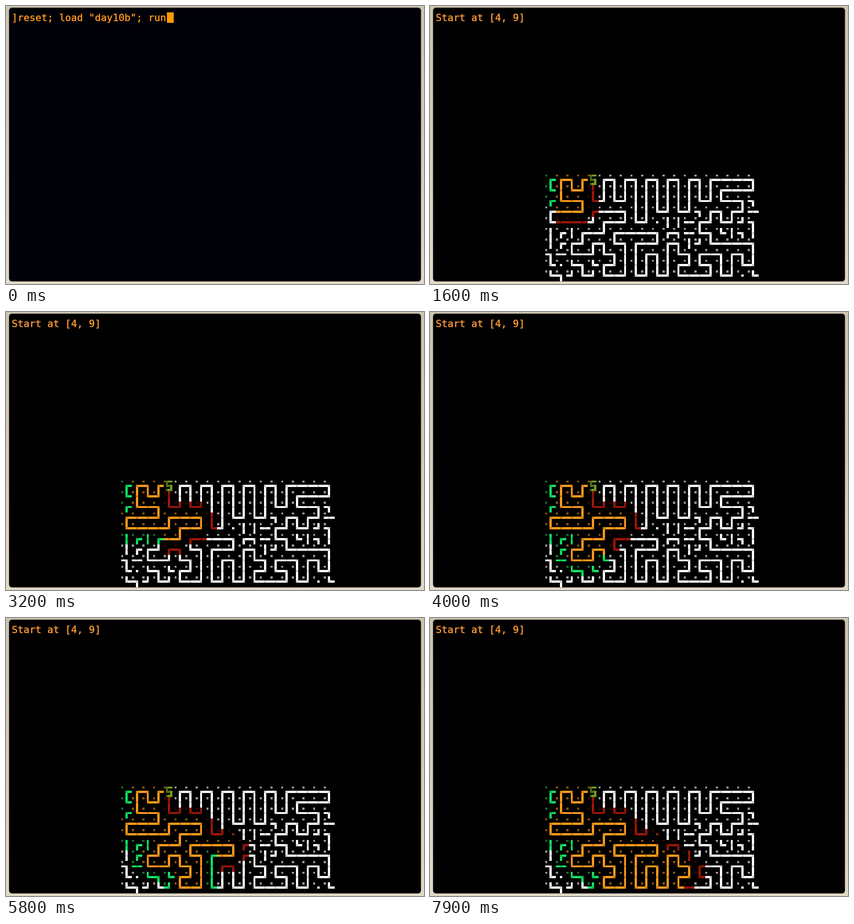
These frames come from a looping animation (917 px wide and 610 px high, 8000 ms). An HTML page with a canvas:

```html
<!DOCTYPE html>
<html lang="en">
<head>
<meta charset="utf-8">
<title>Pipe maze</title>
<style>
  html, body { margin: 0; width: 100%; height: 100%; overflow: hidden; }
  body { background: linear-gradient(#cbc4b0, #d5cdb9 50%, #e2dac8); }
  #screen {
    position: absolute; left: 7px; top: 4px; width: 903px; height: 600px;
    border-radius: 6px; box-shadow: 0 0 1px 0.5px #4a463a;
  }
  canvas { position: absolute; left: 0; top: 0; }
  #line {
    position: absolute; left: 12.5px; top: 13px; white-space: pre;
    font: 21.65px/25px "DejaVu Sans Mono", "Noto Sans Mono", monospace;
    -webkit-text-stroke: 0.5px currentColor;
  }
  #cursor {
    position: absolute; left: 353px; top: 14px; width: 15px; height: 23px;
    background: #ff9a00;
  }
</style>
</head>
<body>
<div id="screen"></div>
<canvas id="maze" width="917" height="610"></canvas>
<div id="line"></div>
<div id="cursor"></div>
<script>
const MAP = [
  'FF7FSF7F7F7F7F7F---7',
  'L|LJ||||||||||||F--J',
  'FL-7LJLJ||||||LJL-77',
  'F--JF--7||LJLJ7F7FJ-',
  'L---JF-JLJ.||-FJLJJ7',
  '|F|F-JF---7F7-L7L|7|',
  '|FFJF7L7F-JF7|JL---7',
  '7-L-JL7||F7|L7F-7F7|',
  'L.L7LFJ|||||FJL7||LJ',
  'L7JLJL-JLJLJL--JLJ.L'
];
const START = [4, 0];
const LOOP = 8000, FRAME = 100;
const FIRST_STEP = 439, STEP = 102.5;

// Directions: 0 north, 1 east, 2 south, 3 west
const DX = [0, 1, 0, -1], DY = [-1, 0, 1, 0];
const ARMS = { '|': [0, 2], '-': [1, 3], L: [0, 1], J: [0, 3], 7: [2, 3], F: [1, 2], '.': [] };

// Each state: line, centre, corner dot
const COLORS = {
  plain: ['#ffffff', '#cfcfcf', '#989898'],
  path:  ['#ff9a1c', '#cf7c18', '#885210'],
  left:  ['#9c1608', '#7e1006', '#300500'],
  right: ['#10e464', '#12b852', '#187038']
};
const S_GLYPH = ['###', '#..', '###', '..#', '###'];

const ctx = document.getElementById('maze').getContext('2d');
const screenEl = document.getElementById('screen');
const lineEl = document.getElementById('line');
const cursorEl = document.getElementById('cursor');

const edgeX = i => Math.round(252.5 + i * 4.68);
const edgeY = i => Math.round(369.5 + i * 4.68);

function block(x, y, w, h, color) {
  ctx.fillStyle = color;
  ctx.fillRect(edgeX(x), edgeY(y), edgeX(x + w) - edgeX(x), edgeY(y + h) - edgeY(y));
}

function drawStart(x, y, lit) {
  S_GLYPH.forEach((row, j) => [...row].forEach((c, i) => {
    if (c !== '#') return;
    const dim = i === 1 ? j === 2 : i === 0;
    const color = lit ? (dim ? '#4c7014' : '#739c1e') : (dim ? '#cfcfcf' : '#ffffff');
    block(x + 1 + i, y + j, 1, 1, color);
  }));
}

function drawCell(cx, cy, state, lit) {
  const x = cx * 5, y = cy * 5, tile = MAP[cy][cx];
  const [line, centre, dot] = COLORS[state];
  block(x, y, 1, 1, dot);
  if (tile === 'S') return drawStart(x, y, lit);
  for (const d of ARMS[tile]) {
    if (d === 0) block(x + 2, y, 1, 2, line);
    if (d === 1) block(x + 3, y + 2, 2, 1, line);
    if (d === 2) block(x + 2, y + 3, 1, 2, line);
    if (d === 3) block(x, y + 2, 2, 1, line);
  }
  block(x + 2, y + 2, 1, 1, tile === '.' ? line : centre);
}

// Walk the loop westwards, marking the cells on either hand
function walk(steps) {
  const states = MAP.map(row => [...row].map(() => 'plain'));
  let [x, y] = START, dir = 3;
  const mark = (turn, state) => {
    const d = (dir + turn) % 4, row = states[y + DY[d]], i = x + DX[d];
    if (row && row[i] && row[i] !== 'path') row[i] = state;
  };
  const markSides = () => { mark(3, 'left'); mark(1, 'right'); };
  if (steps >= 0) states[y][x] = 'path';
  for (let n = 0; n < steps; n++) {
    x += DX[dir];
    y += DY[dir];
    states[y][x] = 'path';
    markSides();
    dir = ARMS[MAP[y][x]].find(d => d !== (dir + 2) % 4);
    markSides();
  }
  return states;
}

function render(t) {
  const prompt = t < 200;
  screenEl.style.background = prompt ? '#000008' : '#000000';
  lineEl.style.color = prompt ? '#ff9a1c' : '#ff9c38';
  lineEl.textContent = prompt ? ']reset; load "day10b"; run' : 'Start at [4, 9]';
  cursorEl.style.display = prompt ? 'block' : 'none';
  ctx.clearRect(0, 0, 917, 610);
  if (t < 300) return;
  const lit = t >= 400;
  const steps = lit ? Math.max(0, Math.floor((t - FIRST_STEP) / STEP) + 1) : -1;
  walk(steps).forEach((row, y) => row.forEach((state, x) => drawCell(x, y, state, lit)));
}

let shown = -1;
function tick() {
  const t = Math.floor(performance.now() % LOOP / FRAME) * FRAME;
  if (t !== shown) render(shown = t);
  requestAnimationFrame(tick);
}
tick();
</script>
</body>
</html>
```
